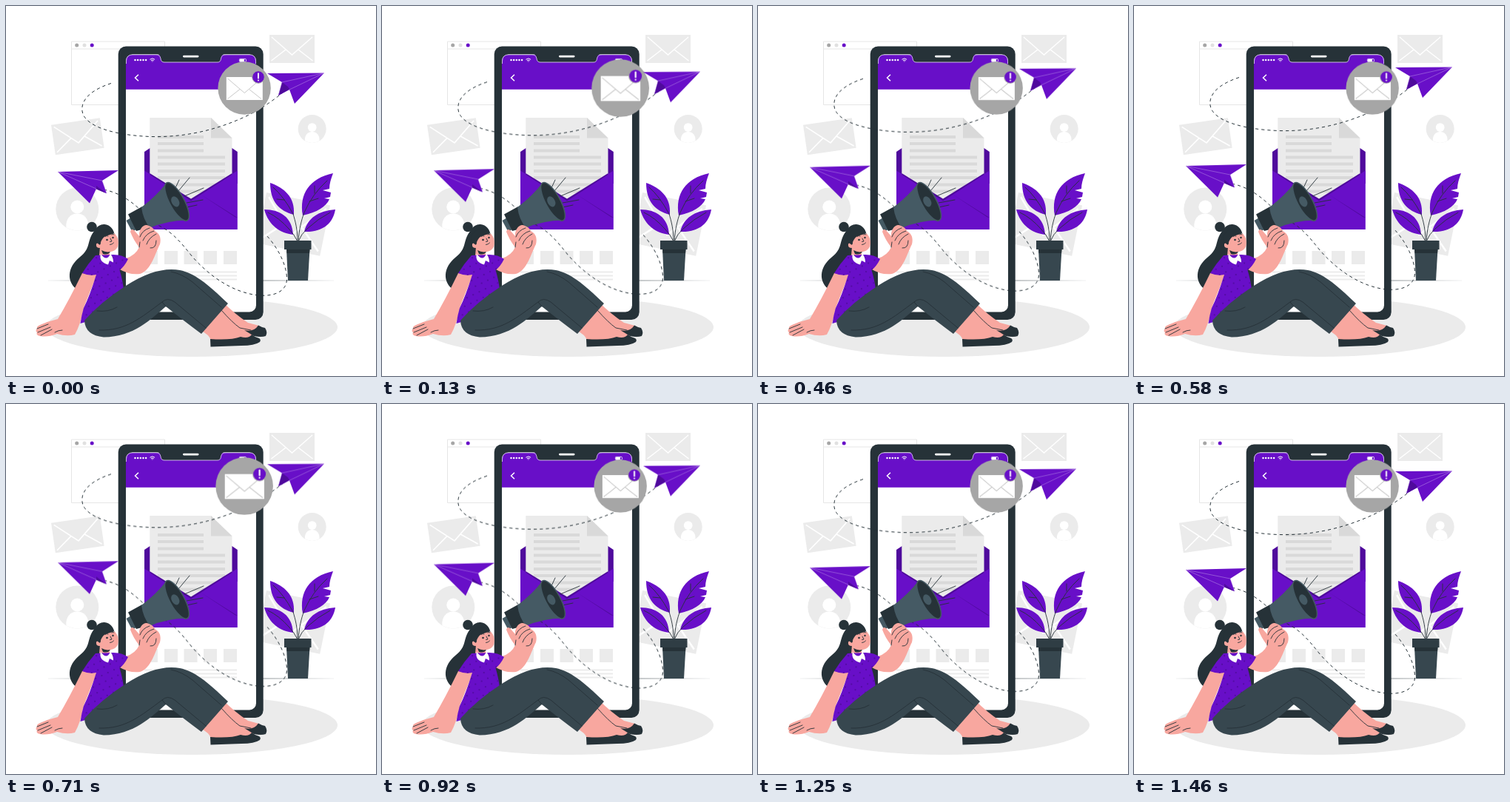
These frames come from a looping animation (500x500 px, 1.5 s). An HTML page without scripts:

```html
<!DOCTYPE html>
<html lang="en">
<head>
<meta charset="utf-8">
<title>Mail campaign</title>
<style>
  html, body { margin: 0; width: 100%; height: 100%; overflow: hidden; background: #fff; }
  svg { display: block; width: 100%; height: 100%; }
  .purple { fill: #680fc8; }
  .deep { fill: #4f0a9c; }
  .dark { fill: #263238; }
  .slate { fill: #37474f; }
  .skin { fill: #f8a79f; }
  .pale { fill: #ebebeb; }
  .white { fill: #fff; }
  .line { fill: none; stroke: #263238; stroke-width: .9; stroke-linecap: round; stroke-linejoin: round; }
  .fold { fill: none; stroke: #fff; stroke-width: 1.5; }
  .crease { fill: none; stroke: #c9a8ec; stroke-width: .45; }
  .trail { fill: none; stroke: #263238; stroke-width: 1; stroke-dasharray: 4.2 4; }
  .float { animation: float 1.5s linear infinite; }
  .beat { transform-origin: 322.1px 111px; animation: beat 1.5s linear infinite; }
  /* both motions rest briefly before the loop restarts */
  @keyframes float {
    0%, 97.3%, 100% { transform: none; }
    48.7% { transform: translateY(-10px); }
  }
  @keyframes beat {
    0%, 29.2%, 38.9%, 58.4%, 100% { transform: scale(1); }
    9.7%, 48.7% { transform: scale(1.1); }
  }
</style>
</head>
<body>
<svg viewBox="0 0 500 500">
  <defs>
    <pattern id="dots" width="14" height="12" patternUnits="userSpaceOnUse" patternTransform="rotate(15)">
      <circle class="deep" cx="3" cy="3" r="1.1"/>
      <circle class="deep" cx="10" cy="9" r="1.1"/>
    </pattern>
    <clipPath id="screen"><rect x="162" y="65.500" width="176" height="348" rx="9"/></clipPath>
    <g id="envelope">
      <rect class="pale" width="61" height="38"/>
      <path class="fold" d="M3 3L30.500 27L58 3M2.500 35L22 20M39 20L58.500 35"/>
    </g>
    <g id="avatar">
      <circle class="pale" r="29"/>
      <circle class="white" cy="-3" r="9"/>
      <path class="white" d="M-15 24.800C-16 13-9 6 0 6S16 13 15 24.800Q0 33-15 24.800"/>
    </g>
    <path id="shirt" d="M121 337Q111 348 103 361Q112 365 122 363Q113 392 105 408Q102 418 100.500 429Q140 420 159 382Q157 368 153.500 357Q160 352 165 342Q157 336 145 336Z"/>
  </defs>

  <!-- background -->
  <path fill="none" stroke="#e6e6e6" d="M88.500 48H214.500V133.500H88.500ZM88.500 58H214.500"/>
  <circle cx="95.700" cy="53" r="2.500" fill="#a6a6a6"/>
  <circle cx="106" cy="53" r="2.500" fill="#e0e0e0"/>
  <circle class="purple" cx="116.200" cy="53" r="2.500"/>
  <use href="#envelope" x="356" y="39"/>
  <use href="#envelope" transform="translate(61 160.700) rotate(-8.200) scale(1.090 1.080)"/>
  <use href="#envelope" transform="translate(352 252) rotate(11.500) scale(1.440 1.830)"/>
  <use href="#avatar" transform="translate(96.300 274.500)"/>
  <use href="#avatar" transform="translate(413.700 166) scale(.655)"/>
  <path class="dark" d="M46 371L249 370.500L453 371L249 371.600Z"/>
  <ellipse class="pale" cx="251" cy="434" rx="197" ry="40"/>

  <!-- plant -->
  <path class="purple" d="M389 282C369 277 357 264 357 239C376 246 391 258 389 282
    M401 283C396 254 410 233 442 226C439 234 437 240 437 247L428 249L439 252L438 258L430 260L437 261C433 271 420 279 401 283
    M388 309C371 307 355 297 349 275C371 275 387 286 388 309M403 305C408 286 422 277 445 275C442 293 429 306 403 305"/>
  <path class="line" stroke-width="1.1" d="M394 318C394 302 391 291 388 281Q375 257 361 245M395 318C396 302 399 290 403 279Q414 254 434 236
    M394 318Q389 308 383 302Q369 286 354 279M395 318Q399 308 407 301Q421 288 438 279M410 264L422 260M417 253L417 243M376 262L366 261"/>
  <path class="slate" d="M379 328H410.500L408 371H381Z"/>
  <path class="dark" d="M379 329H410.500L410 334H379.500Z"/>
  <rect x="376" y="317" width="36.500" height="12" fill="#2f3d44"/>

  <!-- phone -->
  <rect class="dark" x="151.700" y="54.500" width="196" height="369.500" rx="10.500"/>
  <g clip-path="url(#screen)">
    <path class="white" d="M162 65H338V414H162Z"/>
    <path class="purple" d="M162 66H338V112.800H162Z"/>
  </g>
  <path class="dark" d="M203 64.500C208 65 208.500 67 209 71Q209.500 76 214 76H286Q290 76 290.500 71C291 67 292 65 297 64.500Z"/>
  <path fill="none" stroke="#e8dcf6" stroke-width=".8" d="M162.500 78V74Q163 65.800 171 65.800H203Q208 65.800 209 71Q209.500 76 214 76H286Q290 76 290.500 71Q291.500 65.800 297 65.800H329Q337 65.800 337.500 74V78"/>
  <rect class="white" x="239" y="66.700" width="21.500" height="2.700" rx="1.350"/>
  <path d="M174.500 73H190" stroke="#fff" stroke-width="2.500" stroke-linecap="round" stroke-dasharray="0 3.650"/>
  <path d="M194.800 72Q197.800 69.500 200.800 72M196.200 73.600Q197.800 72.300 199.400 73.600M197.800 74.800V75" fill="none" stroke="#fff" stroke-linecap="round"/>
  <rect x="315.400" y="71.400" width="9" height="4" rx="1" fill="none" stroke="#fff" stroke-width=".8"/>
  <rect class="white" x="316" y="72" width="6" height="3"/>
  <path d="M179 92.800L174.500 97L179 101.300" fill="none" stroke="#fff" stroke-width="1.500"/>

  <!-- open letter -->
  <path class="deep" d="M187 197L196 191H304L312.800 197V240H187Z"/>
  <path class="pale" d="M194.300 151H277L305.500 178.500V262H194.300Z"/>
  <path d="M277 151V178.500H305.500Z" fill="#d9d9d9"/>
  <path d="M205 177H267M205 186H267M205 195.500H267M205 204.500H296M205 213.500H296M205 223H296M205 232H296M205 241.500H296M205 250.500H296" stroke="#d9d9d9" stroke-width="4"/>
  <path class="purple" d="M187 222.500L250 262L312.800 222.500V302H187Z"/>
  <path class="deep" d="M194.300 226L250 260.500L305.500 226V228L250 263.500L194.300 228Z
    M262 254L312.800 286L310 285.500ZM238 254L188 286L191 285.500Z"/>
  <path class="pale" d="M187 331h18v18h-18zM214 331h18v18h-18zM240.500 331h18v18h-18zM267 331h18v18h-18zM294 331h18v18h-18z"/>
  <path d="M187 359.500H312M187 364.500H312M187 369.500H312" stroke="#ebebeb" stroke-width="2"/>

  <!-- flight trails -->
  <g class="float">
    <path class="trail" d="M142 104.500C116 113 101 126 103 142C106 164 150 175 196 176.500C250 178 300 163 340 141Q358 130 374 117"/>
    <path class="trail" d="M132 248C165 255 180 275 203 295C225 305 235 318 252 339C275 365 306 387 341 391C367 393 383 383 379 362C376 342 364 323 352 310"/>
  </g>

  <!-- alert -->
  <g class="beat">
    <circle cx="322.100" cy="111" r="35.700" fill="#a6a6a6"/>
    <rect class="white" x="297.800" y="96" width="49" height="31"/>
    <path d="M299.500 98L322.300 117.500L345 98M299.500 125.500L316 112.500M328.500 112.500L345 125.500" fill="none" stroke="#c9c9c9"/>
    <circle class="purple" cx="341" cy="96" r="8.300" stroke="#a6a6a6"/>
    <path d="M341 91.200V97.500M341 100.500V100.600" stroke="#fff" stroke-width="2" stroke-linecap="round"/>
  </g>

  <!-- paper planes -->
  <g class="float">
    <path class="purple" d="M70 224L152 222L130 236L136 253L122 247L113 266.500Z"/>
    <path class="deep" d="M122 243L136 253.500L122 247.500Z"/>
    <path class="crease" d="M70 224L130 236L136 253M70 224L122 247"/>
    <path class="purple" d="M353 91L430 90.500L390 132L383 113L368 121L373 103Z"/>
    <path class="deep" d="M373 103L368 121L383 112.500L381 109Z"/>
    <path class="crease" d="M430 90.500L373 103L368 121M430 90.500L383 113"/>
  </g>

  <!-- megaphone -->
  <path class="line" stroke-width=".7" d="M228 248L234 235M233 250L248 232M241 257L267 246M244 266L266 262M244 272L258 269"/>
  <path d="M162.500 290L169 286L176 302L170.500 305Z" fill="#455a64"/>
  <path class="dark" d="M165 281.500L184 271L195 299L176 304Z"/>
  <path d="M183 272Q203 257 216.500 239.500L245.500 289.500Q216 290 194.500 300Q185 288 183 272" fill="#455a64"/>
  <g transform="translate(231 264.300) rotate(-28.800)">
    <ellipse class="dark" rx="9.800" ry="29" stroke="#455a64" stroke-width="1.500"/>
    <ellipse cx="-2" cy="-1" rx="5" ry="7.500" fill="#455a64"/>
  </g>

  <!-- woman -->
  <circle class="dark" cx="116" cy="298.500" r="6.800"/>
  <path class="dark" d="M120 303C108 318 116 327 99 340C83 353 81 373 97 384C102 381 101 371 109 358C114 349 130 342 128 325L146 306C141 292 126 292 120 303"/>
  <path class="skin" d="M127 325L126 338Q133 350 141 343L140 333Z"/>
  <path class="skin" d="M127 314Q138 309 147 307.500C152 313 153 320 151 325C148 333 137 334 130 330Q128 329 127 327Q121 327 122 321.500Q125 319 128 322Z"/>
  <path class="dark" d="M121 316C121 300 138 298 147 307.500C138 308 130 310 127 323Q122 320 121 316"/>
  <path class="line" d="M134 311.500Q136 309.500 138 311M143 309Q145 307.500 146 309M141 314L143 318L140.500 318.500M140.500 322.500Q143.500 322.500 145.500 320"/>
  <circle class="dark" cx="136.500" cy="316" r="1.300"/>
  <circle class="dark" cx="144.500" cy="313" r="1.200"/>
  <path class="dark" d="M129 330Q135 333.500 141 332Q138 337 131 335Z"/>

  <path class="skin" d="M103 361L123 363Q111 392 105 408Q101 430 93 444Q82 447 69 443Q56 448 46 446Q40 445 42 441Q39 439 42 436Q41 433 46 431Q57 426 70 423Q86 396 103 361"/>
  <path class="line" d="M42 436L57 430M43 441L60 434M47 445L62 437M66 441Q71 438 76 438"/>
  <path class="skin" d="M162 341Q175 337 180 326Q172 316 168 305Q169 300 173 303L180 311C179 301 187 293 193 297Q199 299 201 304Q211 309 208 322C202 333 196 358 181 362Q167 364 152 355Z"/>
  <path class="line" d="M181 312Q184 303 194 300M185 317Q189 307 200 304M190 322Q193 313 203 308M195 327Q203 328 203 317M180 326L181 319"/>
  <use href="#shirt" class="purple"/>
  <use href="#shirt" fill="url(#dots)"/>
  <path class="white" d="M128 335Q125 346 138 349.500L140 344L145 346.500Q145 339 141 335Q136 346 128 335Z"/>

  <!-- legs -->
  <path class="skin" d="M292 399Q310 417 327 428L342 432L331 442L334 446Q312 455 277 452Q275 444 262 438Z"/>
  <path class="line" d="M291 411Q306 428 316 435L331 438"/>
  <path class="dark" d="M322 438Q335 441 341 431.500Q345 434 350 435Q354 441 351 446Q345 448 335 446Z"/>
  <path class="dark" d="M276 450Q304 452 317 447Q328 450 332 444Q337 448 342 449Q345 451 343 454Q336 459 318 459L276.500 460.500Z"/>
  <path class="slate" d="M106 425Q128 400 162 378C189 360 215 353 235 357C254 361 271 374 300 402L264 443Q241 426 216 406C196 423 173 447 132 447.500Q107 445 106 425"/>
  <path class="line" d="M223 359Q238 362 252 373L291 407M216 406L211 400Q218 393 228 400L270 435M211 400C181 422 162 439 126 438M123 412Q138 414 150 407"/>
</svg>
</body>
</html>
```
